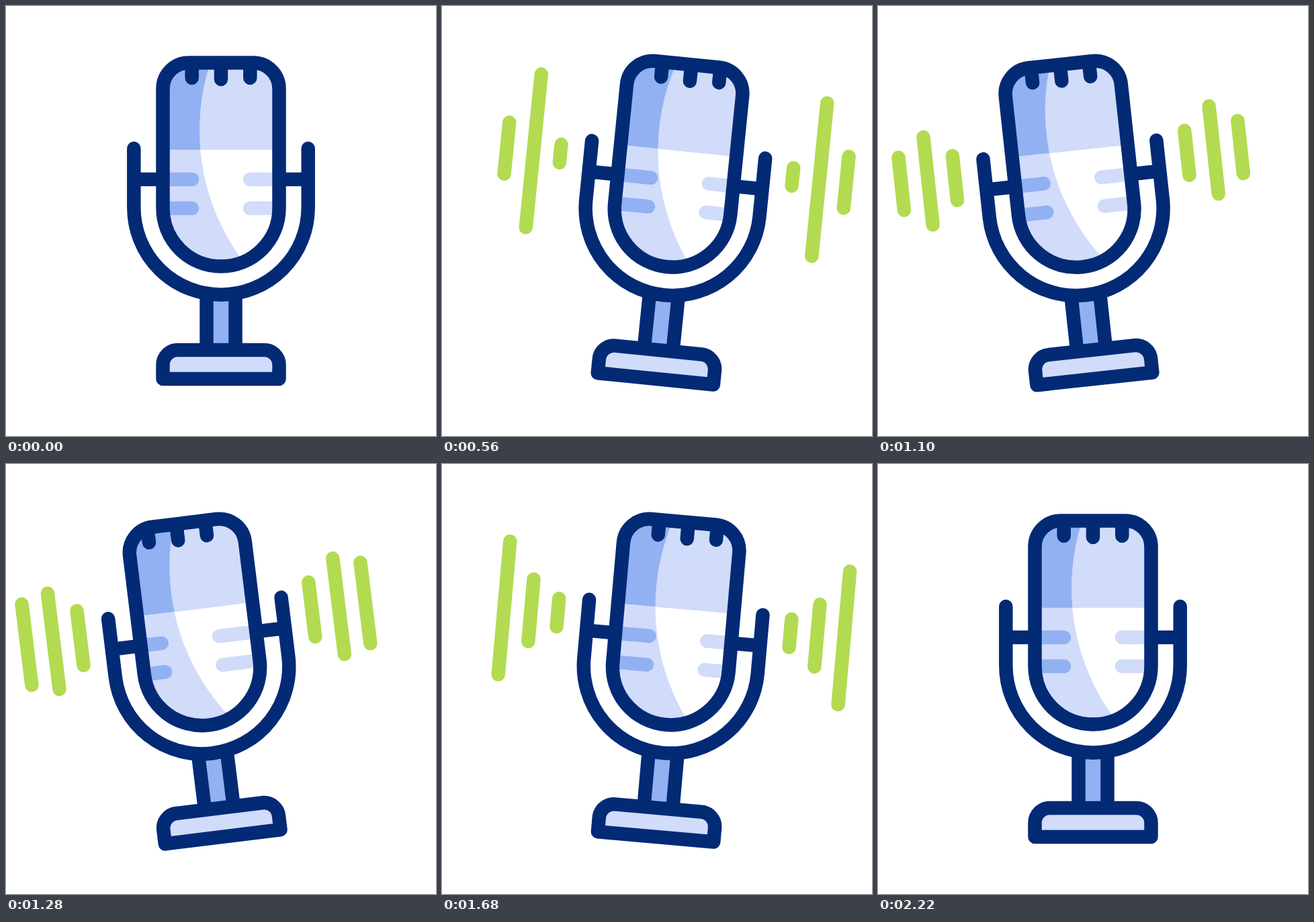
An HTML page for the animation above (2.4 s loop, 640x640 px).

```html
<!DOCTYPE html>
<html lang="en">
<head>
<meta charset="utf-8">
<title>Microphone</title>
<style>
  html, body { margin: 0; width: 100%; height: 100%; overflow: hidden; background: #fff; }
  svg { display: block; width: 100%; height: 100%; }
  path { fill: none; stroke-width: 20.5; stroke-linecap: round; stroke-linejoin: round; }
  .ink { stroke: #032a75; }
  .mid { stroke: #92b1f2; }
  .pale { stroke: #d1dbfa; }
  .fill-mid { fill: #92b1f2; }
  .fill-pale { fill: #d1dbfa; }
  #bars { stroke: #b2db52; stroke-linecap: round; }
</style>
</head>
<body>
<svg viewBox="0 0 640 640">
  <defs>
    <path id="body" d="M233.5 123a38.5 38.5 0 0 1 38.5-38.5h96a38.5 38.5 0 0 1 38.5 38.5V301a86.5 86.5 0 0 1-173 0z"/>
    <clipPath id="inside"><use href="#body"/></clipPath>
    <clipPath id="shade"><circle cx="614" cy="185" r="326"/></clipPath>
  </defs>
  <g id="mic">
    <g id="bars"></g>
    <rect class="fill-mid" x="298" y="430" width="44" height="82"/>
    <path class="ink" d="M298.5 432V510M341.5 432V510"/>
    <path class="ink fill-pale" d="M233.5 555V534a22 22 0 0 1 22-22h129a22 22 0 0 1 22 22v21z"/>
    <path class="ink" d="M190.3 212V300a129.7 129.7 0 0 0 259.4 0V212M190.3 258H233M407 258H449.7"/>
    <g clip-path="url(#inside)">
      <rect class="fill-mid" x="230" y="80" width="180" height="134"/>
      <rect class="fill-pale" x="230" y="214" width="180" height="180"/>
      <g clip-path="url(#shade)">
        <rect class="fill-pale" x="230" y="80" width="180" height="134"/>
        <rect fill="#fff" x="230" y="214" width="180" height="180"/>
      </g>
      <g class="detail">
        <path class="mid" d="M200 258H277M200 301H277"/>
        <path class="pale" d="M363 258H440M363 301H440"/>
      </g>
    </g>
    <use href="#body" class="ink"/>
    <path class="ink detail" d="M276.7 92V107M320 92V109M363.3 92V107"/>
  </g>
</svg>
<script>
const LOOP = 2400, START = 190, END = 2220, BEAT = 280;
const PIVOT = "320 533", BAR_Y = 235.5;

// Evenly spaced key values
const swing = [0, 7, -7.8, 5.2, 0];
const drift = [0, 12.5, -13, 11, 0];
const pulses = [
  [0, 27, 112, 66, 92, 42, 0],
  [0, 229, 150, 131, 152, 93, 0],
  [0, 77, 147, 78, 149, 199, 0]
];

const clamp = (v, max = 1) => Math.min(max, Math.max(0, v));

// Eases in and out between neighbouring keys; pos counts keys
function along(keys, pos) {
  const p = clamp(pos, keys.length - 1);
  const i = Math.min(Math.floor(p), keys.length - 2), f = p - i;
  return keys[i] + (keys[i + 1] - keys[i]) * f * f * (3 - 2 * f);
}

const mic = document.getElementById("mic");
const group = document.getElementById("bars");
const details = document.querySelectorAll(".detail");

const bars = pulses.flatMap((keys, i) => [-1, 1].map(side => {
  const line = document.createElementNS("http://www.w3.org/2000/svg", "line");
  const x = 319.2 + side * (173.7 + 40.1 * i);
  line.setAttribute("x1", x);
  line.setAttribute("x2", x);
  return { keys, line: group.appendChild(line) };
}));

function draw(t) {
  const progress = clamp((t - START) / (END - START));
  mic.setAttribute("transform", `rotate(${along(swing, 4 * progress)} ${PIVOT})`);

  // The details trail behind the swing and catch up towards the end
  const shift = along(drift, 4 * progress ** 1.21);
  for (const el of details) el.setAttribute("transform", `translate(${shift} 0)`);

  group.setAttribute("stroke-width", 20.5 * clamp(Math.min(t - START, END - t) / 50));
  for (const { keys, line } of bars) {
    const half = along(keys, t / BEAT - 1) / 2;
    line.setAttribute("y1", BAR_Y - half);
    line.setAttribute("y2", BAR_Y + half);
  }
}

const begin = performance.now();
function tick() {
  draw((performance.now() - begin) % LOOP);
  requestAnimationFrame(tick);
}
tick();
</script>
</body>
</html>
```
